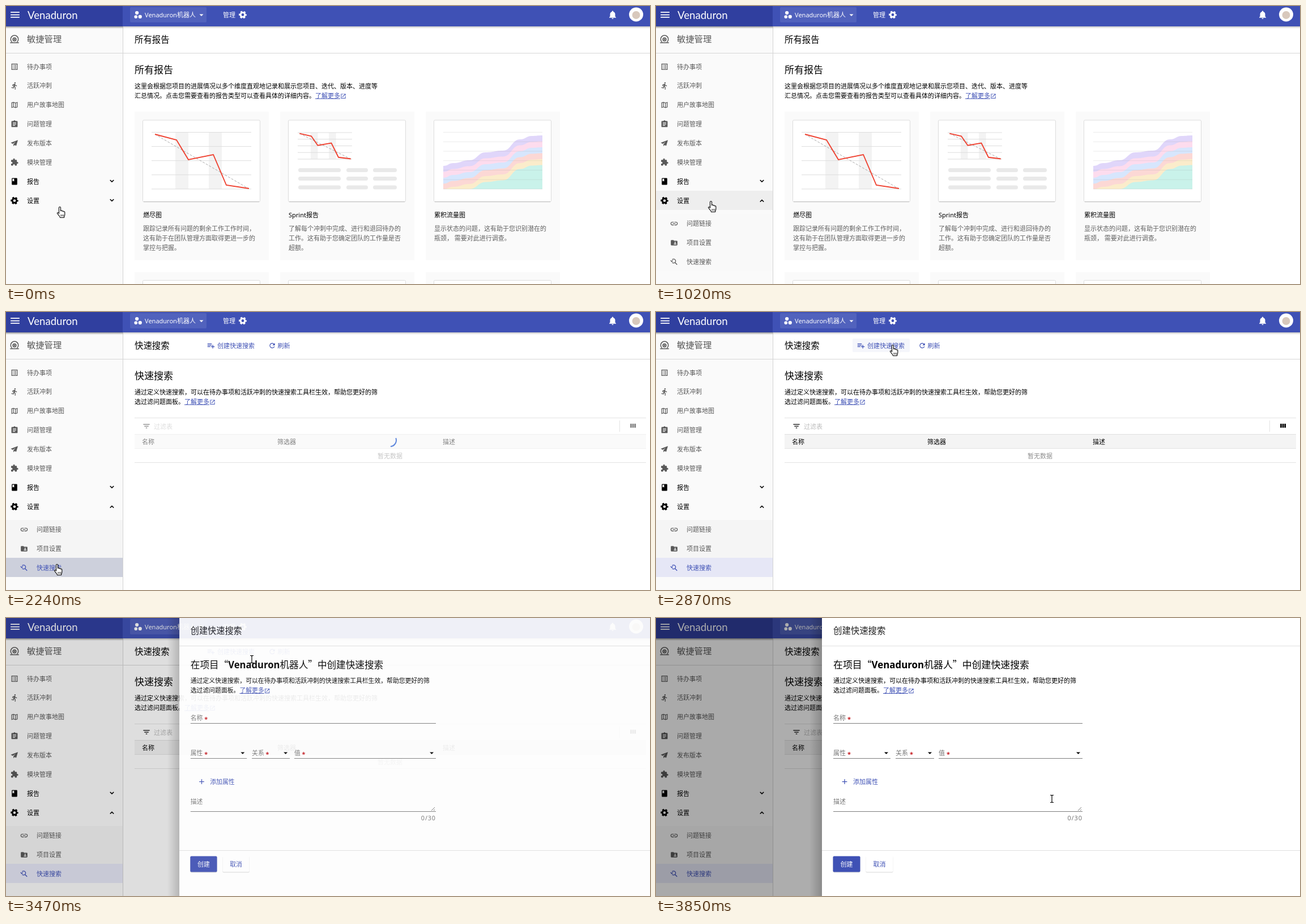
An HTML page that plays this animation: 1137x492 px, repeating every 3.93 s.

```html
<!DOCTYPE html>
<html lang="zh-CN">
<head>
<meta charset="utf-8">
<title>快速搜索</title>
<style>
html, body { margin: 0; width: 100%; height: 100%; overflow: hidden; background: #fff; }
svg { display: block; width: 1137px; height: 492px; }
text { font-family: "Noto Sans", "Noto Sans CJK SC", "Noto Sans CJK", sans-serif; white-space: pre; }
.cjk { font-family: "Noto Sans CJK SC", "Noto Sans CJK", sans-serif; }
.logo { font-family: Lato, sans-serif; font-weight: 400; }
</style>
</head>
<body>
<svg id="stage" viewBox="0 0 1137 492" xmlns="http://www.w3.org/2000/svg"></svg>
<script>
const LOOP = 3930;
const BLUE = '#3f51b5', GREY = '#595959';
const NAME = 'Venaduron';

// Filled 24-unit icon shapes
const ICONS = {
  menu: 'M3 18h18v-2H3zM3 13h18v-2H3zM3 6v2h18V6z',
  list: 'M3 3h18v18H3zM5 5v14h14V5zM11 7h6v2h-6zM11 11h6v2h-6zM11 15h6v2h-6zM7 7h2v2H7zM7 11h2v2H7zM7 15h2v2H7z',
  run: 'M13.5 5.5a2 2 0 1 0 0-4 2 2 0 0 0 0 4zM9.9 19.4l1-4.4 2.1 2v6h2v-7.5l-2.1-2 .6-3c1.3 1.5 3.3 2.5 5.5 2.5v-2c-1.9 0-3.5-1-4.3-2.4l-1-1.6c-.4-.6-1-1-1.7-1l-6 2.3v4.7h2V9.6l1.8-.7-1.6 8.1-4.9-1-.4 2z',
  map: 'M21 3l-6 2.1L9 3 3 5v16l6-2.1 6 2.1 6-2zM10 5.5l4 1.4v11.6l-4-1.4zM5 6.5l3-1v11.7l-3 1.1zM19 17.5l-3 1V6.9l3-1.2z',
  task: 'M19 3h-4.2a3 3 0 0 0-5.6 0H5a2 2 0 0 0-2 2v14a2 2 0 0 0 2 2h14a2 2 0 0 0 2-2V5a2 2 0 0 0-2-2zM14 17H7v-2h7zM17 13H7v-2h10zM17 9H7V7h10z',
  plane: 'M22 3L1 11l6 3 8-6-6 7.5V21l3.5-3.5L17 20z',
  puzzle: 'M20.5 11H19V7a2 2 0 0 0-2-2h-4V3.5a2.5 2.5 0 0 0-5 0V5H4a2 2 0 0 0-2 2v3.8h1.5a2.7 2.7 0 0 1 0 5.4H2V20a2 2 0 0 0 2 2h3.8v-1.5a2.7 2.7 0 0 1 5.4 0V22H17a2 2 0 0 0 2-2v-4h1.5a2.5 2.5 0 0 0 0-5z',
  book: 'M18 2H6a2 2 0 0 0-2 2v16a2 2 0 0 0 2 2h12a2 2 0 0 0 2-2V4a2 2 0 0 0-2-2zM6 4h5v8l-2.5-1.5L6 12z',
  link: 'M3.9 12A3.1 3.1 0 0 1 7 8.9h4V7H7a5 5 0 0 0 0 10h4v-1.9H7A3.1 3.1 0 0 1 3.9 12zM8 13h8v-2H8zM17 7h-4v1.9h4a3.1 3.1 0 0 1 0 6.2h-4V17h4a5 5 0 0 0 0-10z',
  folder: 'M20 6h-8l-2-2H4a2 2 0 0 0-2 2v12a2 2 0 0 0 2 2h16a2 2 0 0 0 2-2V8a2 2 0 0 0-2-2zM15 9a2 2 0 1 1 0 4 2 2 0 0 1 0-4zM19 17h-8v-1c0-2.7 8-2.7 8 0z',
  bell: 'M12 22a2 2 0 0 0 2-2h-4a2 2 0 0 0 2 2zM18 16v-5c0-3-1.6-5.6-4.5-6.3V4a1.5 1.5 0 0 0-3 0v.7C7.6 5.4 6 8 6 11v5l-2 2v1h16v-1z',
  open: 'M19 19H5V5h7V3H3v18h18v-9h-2zM14 3v2h3.6l-9.8 9.8 1.4 1.4L19 6.4V10h2V3z',
  filter: 'M10 18h4v-2h-4zM3 6v2h18V6zM6 13h12v-2H6z',
  create: 'M14 10H2v2h12zM14 6H2v2h12zM18 14v-4h-2v4h-4v2h4v4h2v-4h4v-2zM2 16h8v-2H2z',
  refresh: 'M17.7 6.3A8 8 0 1 0 19.7 14h-2.1A6 6 0 1 1 16.2 7.8L13 11h7V4z',
  columns: 'M3 5h5v13H3zM9.7 5h5v13h-5zM16.4 5h5v13h-5z',
  chevron: 'M16.6 7.6L12 12.2 7.4 7.6 5.5 9.5l6.5 6.5 6.5-6.5z',
  drop: 'M5 9l7 7 7-7z',
  plus: 'M19 13h-6v6h-2v-6H5v-2h6V5h2v6h6v2z',
  nodes: 'M9 1.5a5 5 0 1 1 0 10 5 5 0 0 1 0-10zM6 13a4.6 4.6 0 1 1 0 9.2A4.6 4.6 0 0 1 6 13zM18 12.5a5 5 0 1 1 0 10 5 5 0 0 1 0-10z'
};

const rect = (x, y, w, h, fill, more = '') =>
  `<rect x="${x}" y="${y}" width="${w}" height="${h}" fill="${fill}" ${more}/>`;
const line = (x1, y1, x2, y2, color, more = '') =>
  `<path d="M${x1} ${y1}L${x2} ${y2}" stroke="${color}" fill="none" ${more}/>`;
const text = (x, cy, s, fill = '#000', size = 11, more = '') =>
  `<text x="${x}" y="${cy + size * .38}" font-size="${size}" fill="${fill}" ${more}>${s}</text>`;
const place = (cx, cy, size) =>
  `transform="translate(${cx - size / 2} ${cy - size / 2}) scale(${size / 24})"`;
const icon = (name, cx, cy, size, fill = GREY) =>
  `<path d="${ICONS[name]}" fill="${fill}" fill-rule="evenodd" ${place(cx, cy, size)}/>`;
const stroked = (body, cx, cy, size, color, w = 2) =>
  `<g fill="none" stroke="${color}" stroke-width="${w}" ${place(cx, cy, size)}>${body}</g>`;
const gear = (cx, cy, size, color) => stroked(
  '<circle cx="12" cy="12" r="5.8" stroke-width="4.4"/>' +
  '<circle cx="12" cy="12" r="8.8" stroke-width="3.2" pathLength="12" stroke-dasharray="1.1 .9" stroke-dashoffset=".55"/>',
  cx, cy, size, color);
const group = (id, body, more = '') => `<g id="${id}" ${more}>${body}</g>`;

function intro(x, y, rows, linkAt) {
  return rows.map((s, i) => text(x, y + 17 * i, s)).join('') +
    text(linkAt, y + 17, '了解更多', BLUE) +
    line(linkAt, y + 22.5, linkAt + 44, y + 22.5, BLUE) +
    icon('open', linkAt + 49.5, y + 18, 11, BLUE);
}

function header() {
  return rect(0, 36, 1137, 4, 'url(#under)') +
    rect(0, 0, 1137, 36, BLUE) + rect(0, 0, 206, 36, '#303f9f') +
    icon('menu', 16, 15.5, 21, '#fff') +
    text(38, 16, NAME, '#fff', 18.6, 'class="logo"') +
    rect(219, 2, 135, 27, '#5162bd', 'rx="2"') +
    icon('nodes', 233, 15.5, 15, '#fff') +
    text(245, 15.5, NAME + '机器人', '#fff', 11, 'font-weight="500"') +
    icon('drop', 345, 16, 12, '#fff') +
    text(383, 15.5, '管理', '#fff', 11, 'font-weight="500"') + gear(418, 15.5, 16, '#fff') +
    icon('bell', 1071, 15.5, 18, '#fff') +
    '<circle cx="1112.5" cy="15" r="12.5" fill="#fff"/><circle cx="1112.5" cy="16" r="7" fill="#d8c8bc"/>';
}

function sidebar() {
  const items = [['list', '待办事项'], ['run', '活跃冲刺'], ['map', '用户故事地图'],
    ['task', '问题管理'], ['plane', '发布版本'], ['puzzle', '模块管理']];
  const rowY = i => 107.5 + 33.8 * i;
  const sub = rect(0, 368, 206, 101, '#f5f5f5', 'id="subBack"') +
    rect(0, 435, 206, 34, '#ebebeb', 'id="subHover"') +
    icon('link', 32, 385, 15) + text(54, 385, '问题链接', GREY) +
    icon('folder', 32, 419, 14) + text(54, 419, '项目设置', GREY) +
    group('searchItem', stroked('<circle cx="10.5" cy="10" r="6" pathLength="100" stroke-dasharray="76 24" stroke-dashoffset="38"/>' +
      '<path d="M15 15l6 6M1.5 8l3 3.5 3.5-3"/>', 32, 452.5, 14, 'currentColor', 2.3) +
      text(54, 452.5, '快速搜索', 'currentColor'));
  return rect(0, 36, 206, 456, '#fafafa') + rect(0, 36, 206, 4, 'url(#under)') +
    line(206.5, 36, 206.5, 492, '#d3d3d3') + line(0, 83.5, 1137, 83.5, '#d6d6d6') +
    stroked('<path d="M6 19a9.5 9.5 0 1 1 12 0M1 20.5h22"/><circle cx="12" cy="12" r="4"/><circle cx="12" cy="12" r="1"/>', 15, 59, 17, GREY, 2.2) +
    text(37, 58.5, '敏捷管理', GREY, 15.3) +
    items.map(([n, s], i) => icon(n, 15, rowY(i), 14.5) + text(37, rowY(i), s, GREY)).join('') +
    rect(0, 327, 206, 34, '#eee', 'id="rowHover"') +
    icon('book', 15, 310.5, 14.5, '#000') + text(37, 310.5, '报告', '#000', 11, 'font-weight="500"') +
    icon('chevron', 187, 310, 14, '#000') +
    gear(15, 344.5, 15.5, '#000') + text(37, 344.5, '设置', '#000', 11, 'font-weight="500"') +
    group('arrow', icon('chevron', 187, 344, 14, '#000')) +
    group('sub', sub, 'clip-path="url(#subClip)"');
}

function burndown(move) {
  const grid = [0, 1, 2, 3, 4].map(i => line(257, 223.5 + i * 25.1, 433, 223.5 + i * 25.1, '#ddd', 'vector-effect="non-scaling-stroke"')).join('');
  return `<g transform="${move}">` + rect(299, 223, 23, 101, '#f3f3f3') + rect(358, 223, 23, 101, '#f3f3f3') + grid +
    line(263, 227, 428, 323, '#aaa', 'stroke-dasharray="4 2.5" vector-effect="non-scaling-stroke"') +
    '<path d="M263 227L301 237L322 272L366 263L389 317L429 323" fill="none" stroke="#ef4130" stroke-width="1.9" vector-effect="non-scaling-stroke"/></g>';
}

function flow() {
  const pts = [[772, 283], [790, 278], [818, 273], [847, 259], [877, 256], [908, 236], [928, 230], [947, 229]];
  const colors = ['#e0d6fa', '#fddcee', '#d7e6fd', '#fcd8d5', '#fbeccb', '#c9f2ea'];
  const area = shift => pts.reduce((d, [x, y], i) => {
    const h = Math.min(324, y + shift);
    if (!i) return `M${x} ${h}`;
    const [px, py] = pts[i - 1], m = (x + px) / 2;
    return d + `C${m} ${Math.min(324, py + shift)} ${m} ${h} ${x} ${h}`;
  }, '') + 'V324H772z';
  return colors.map((c, i) => `<path d="${area(i * 10.5)}" fill="${c}"/>`).join('') +
    [0, 1, 2, 3, 4, 5, 6].map(i => line(772, 223.5 + i * 16.75, 947, 223.5 + i * 16.75, '#888', 'opacity=".17"')).join('');
}

function reports() {
  const xs = [227, 484, 741];
  const cards = [
    ['燃尽图', '跟踪记录所有问题的剩余工作工作时间，', '这有助于在团队管理方面取得更进一步的', '掌控与把握。'],
    ['Sprint报告', '了解每个冲刺中完成、进行和退回待办的', '工作。这有助于您确定团队的工作量是否', '超额。'],
    ['累积流量图', '显示状态的问题，这有助于您识别潜在的', '瓶颈， 需要对此进行调查。']
  ];
  const thumb = (x, y) => rect(x + 14.5, y, 207, 144.5, '#fff', 'stroke="#dcdcdc" rx="2"') +
    line(x + 16, y + 144.5, x + 220, y + 144.5, '#b5b5b5');
  const pills = [290.5, 305.5, 321].map(y => [[516, 75], [601, 38], [648, 42]]
    .map(([x, w]) => rect(x, y - 3.5, w, 7, '#e9e9e9', 'rx="3.5"')).join('')).join('');
  return text(227, 59.5, '所有报告', '#000', 15.4) + text(227, 113, '所有报告', '#000', 17) +
    intro(227, 141.5, ['这里会根据您项目的进展情况以多个维度直观地记录和展示您项目、迭代、版本、进度等',
      '汇总情况。点击您需要查看的报告类型可以查看具体的详细内容。'], 546) +
    cards.map(([title, ...rows], i) => {
      const x = xs[i];
      return rect(x, 187, 237, 263, '#fafafa') + thumb(x, 202) +
        rect(x, 471, 237, 30, '#fafafa') + thumb(x, 485.5) +
        text(x + 15, 370, title, '#000', 11, 'font-weight="500"') +
        rows.map((s, k) => text(x + 15, 393.5 + 17 * k, s, '#606060')).join('');
    }).join('') +
    burndown('') + burndown('translate(515 224) scale(.545 .468) translate(-257 -223.5)') + pills + flow();
}

function searchPage() {
  const table = icon('filter', 248, 202, 15, '#000') + text(261, 202.5, '过滤表', '#bbb') +
    icon('columns', 1107, 201.5, 13, '#000') +
    rect(227, 216, 903, 25, '#f4f4f4') +
    line(227, 216.5, 1130, 216.5, '#e0e0e0') + line(227, 241.5, 1130, 241.5, '#e3e3e3') +
    text(240, 229.5, '名称') + text(479, 229.5, '筛选器') + text(771, 229.5, '描述') +
    text(656, 254.5, '暂无数据', '#8c8c8c');
  return text(227, 59.5, '快速搜索', '#000', 15.4) + text(227, 113, '快速搜索', '#000', 17) +
    rect(347, 47, 101, 24, '#f5f6fb', 'rx="2" id="createHover"') +
    icon('create', 362, 59.5, 15, BLUE) + text(373, 59.5, '创建快速搜索', BLUE) +
    icon('refresh', 470, 59.5, 14, BLUE) + text(479.5, 59.5, '刷新', BLUE) +
    intro(227, 141.5, ['通过定义快速搜索，可以在待办事项和活跃冲刺的快速搜索工具栏生效，帮助您更好的筛', '选过滤问题面板。'], 315) +
    line(227, 187.5, 1130, 187.5, '#e3e3e3') + line(1083.5, 192, 1083.5, 212, '#e3e3e3') +
    line(227, 266.5, 1130, 266.5, '#e3e3e3') + group('table', table) +
    '<path id="spinner" d="M10.3 -3.8A11 11 0 0 1 1 11" fill="none" stroke="#5f87dc" stroke-width="2"/>';
}

function button(x, w, label, fill, color) {
  return rect(x - .5, 422, w + 1, 28.5, '#000', 'rx="2" opacity=".16"') +
    rect(x - .5, 421.5, w + 1, 28, fill, 'rx="2"') +
    text(x + 12.5, 436, label, color, 11, 'font-weight="500"');
}

function drawer() {
  const label = (x, y, s) => text(x, y, s + ' <tspan dy="1.5" fill="#c4161c" font-weight="700">*</tspan>', '#757575');
  const under = (x1, x2, y) => line(x1, y, x2, y, '#7c7c7c');
  return rect(271, 0, 22, 492, 'url(#side)') + rect(293, 0, 844, 492, '#fff') +
    line(293, 49.5, 1137, 49.5, '#e0e0e0') + text(313, 22.5, '创建快速搜索', '#222', 15.4) +
    text(313, 83, `<tspan class="cjk">在项目“</tspan><tspan font-weight="600">${NAME}</tspan>机器人<tspan class="cjk">”中创建快速搜索</tspan>`, '#000', 16.9) +
    intro(313, 111, ['通过定义快速搜索，可以在待办事项和活跃冲刺的快速搜索工具栏生效，帮助您更好的筛', '选过滤问题面板。'], 401) +
    label(313, 177, '名称') + under(313, 753, 186.5) +
    [[313, 414, '属性'], [423, 491, '关系'], [499, 753, '值']].map(([a, b, s]) =>
      label(a, 239, s) + under(a, b, 248.5) + icon('drop', b - 7.5, 239, 12, '#000')).join('') +
    icon('plus', 333, 289.5, 15, BLUE) + text(348, 289.5, '添加属性', BLUE) +
    text(313, 324.5, '描述', '#757575') + under(313, 753, 342.5) +
    line(745, 341, 751, 335, '#777') + line(749, 341, 751, 339, '#777') +
    text(753, 354, '0/30', '#757575', 11, 'text-anchor="end" letter-spacing=".9"') +
    line(293, 411.5, 1137, 411.5, '#e0e0e0') +
    button(313, 47, '创建', BLUE, '#fff') + button(371, 47, '取消', '#fff', BLUE);
}

const stage = document.getElementById('stage');
stage.innerHTML =
  '<defs><clipPath id="subClip"><rect id="subBox" y="361" width="206" height="0"/></clipPath>' +
  '<linearGradient id="under" x2="0" y2="1"><stop stop-opacity=".22"/><stop offset="1" stop-opacity="0"/></linearGradient>' +
  '<linearGradient id="side"><stop stop-opacity="0"/><stop offset="1" stop-opacity=".2"/></linearGradient></defs>' +
  rect(0, 0, 1137, 492, '#fff') + group('reports', reports()) + group('search', searchPage()) +
  sidebar() + header() + rect(0, 0, 1137, 492, '#000', 'id="mask"') + group('drawer', drawer()) +
  group('hand', '<path d="M3.5 12V2a1.5 1.5 0 0 1 3 0v6c0-1.6 2.5-1.6 2.6 0v.6c.2-1.3 2.4-1.2 2.5.2v.6c.3-1 2.2-.9 2.2.6v4c0 2-1.3 3-1.3 5.5H5.5C5.5 17 1.8 14.5.6 12.3c-.7-1.5 1.2-2.4 2.9-.3z" fill="#fff" stroke="#000" stroke-width="1.1"/>' +
    '<path d="M7 14v3.5M9.2 14v3.5M11.4 14v3.5" stroke="#000" stroke-width=".8"/>') +
  group('beam', '<path d="M-3 -6.5H-1L0 -5.5L1 -6.5H3M0 -5.5V5.5M-3 6.5H-1L0 5.5L1 6.5H3" fill="none" stroke="#000" stroke-width="1.2"/>');

const $ = id => document.getElementById(id);
const set = (id, key, value) => $(id).setAttribute(key, value);
const show = (id, on) => set(id, 'opacity', +on);
const clamp = v => Math.max(0, Math.min(1, v));
const easeOut = p => 1 - (1 - clamp(p)) ** 5;

// Screen recording: the picture only changes at these moments
const ticks = [0, 50, 130, 210, 290, 380, 520, 590, 700, 780, 860, 940, 1020, 1050, 1130, 1220,
  1370, 1450, 1530, 1610, 1700, 1770, 1840, 1950, 2020, 2090, 2160, 2240, 2340, 2380,
  2510, 2590, 2660, 2730, 2800, 2870, 3000, 3090, 3170, 3250, 3320, 3390, 3470, 3530, 3610, 3690, 3770, 3850];
const handPath = [[0, 90, 355], [380, 92, 345], [1020, 92, 345], [1130, 88, 420], [1220, 84, 467], [1450, 82, 447],
  [2160, 82, 447], [2240, 85, 446], [2340, 130, 380], [2380, 230, 238], [2510, 300, 160], [2590, 350, 110], [2730, 413, 58]];
const beamPath = [[3470, 434, 73], [3610, 470, 110], [3770, 640, 270], [3850, 699, 320]];

function along(path, t) {
  const i = path.findIndex(k => k[0] > t);
  if (i <= 0) return i ? path.at(-1).slice(1) : path[0].slice(1);
  const [a, b] = [path[i - 1], path[i]], p = (t - a[0]) / (b[0] - a[0]);
  return [a[1] + (b[1] - a[1]) * p, a[2] + (b[2] - a[2]) * p];
}

function draw(t) {
  const swapped = t >= 2090, beam = t >= 3390;
  show('reports', !swapped);
  show('search', swapped);
  show('rowHover', t >= 130 && t < 1130);

  const open = easeOut((t - 700) / 300);
  set('subBox', 'height', 131 * open);
  set('arrow', 'transform', `rotate(${180 * open} 187 344.25)`);
  set('subBack', 'fill', swapped ? '#f5f5f5' : '#f9f9f9');
  show('subHover', t >= 1220);
  set('subHover', 'fill', t < 1950 ? '#ebebeb' : t < 2380 ? '#cdd0dc' : '#e6e7f6');
  set('searchItem', 'color', t >= 1220 ? BLUE : GREY);

  const loading = t < 2590;
  set('table', 'opacity', loading ? .5 : 1);
  show('spinner', loading);
  set('spinner', 'transform', `translate(678 227) rotate(${(t - 2240) * .3})`);
  show('createHover', t >= 2730 && !beam);

  // The mask fades evenly while the drawer eases out
  const entry = clamp((t - 3350) / 300), slide = easeOut(entry);
  set('mask', 'opacity', .32 * entry);
  set('drawer', 'opacity', slide);
  set('drawer', 'transform', `translate(1137 0) scale(${.8 + .2 * slide} 1) translate(-1137 0)`);

  show('hand', !beam);
  show('beam', beam);
  set('hand', 'transform', `translate(${along(handPath, t)})`);
  set('beam', 'transform', `translate(${along(beamPath, t)})`);
}

function loop() {
  const now = performance.now() % LOOP;
  draw(ticks.findLast(k => k <= now));
  requestAnimationFrame(loop);
}
loop();
</script>
</body>
</html>
```
